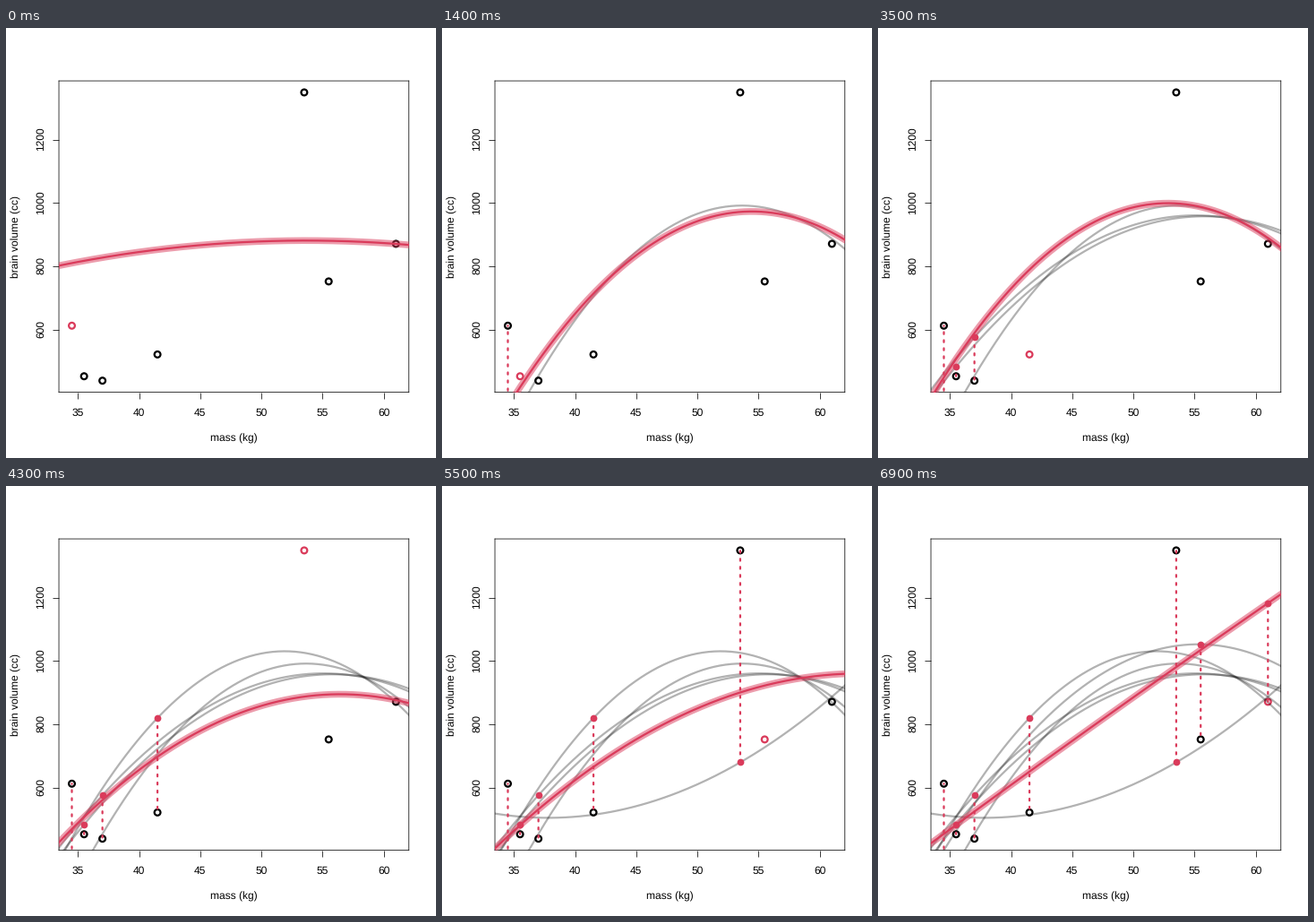
Animation, 480 px wide and 480 px high, one loop 7 s. Source, as a matplotlib script:

```python
import numpy as np
import matplotlib.pyplot as plt
from matplotlib.animation import FuncAnimation

plt.rcParams.update({
    "font.family": "Liberation Sans",
    "font.size": 12,
    "text.hinting": "none",
    "path.snap": False,
})

SIZE = 480
LEFT, RIGHT, TOP, BOTTOM = 59.04, 449.76, 59.04, 406.56
RED = "#da3b5b"
STEPS = 10

mass = np.array([34.5, 35.5, 37, 41.5, 53.5, 55.5, 61])
brain = np.array([612, 452, 438, 521, 1350, 752, 871])
COUNT = len(mass)

# Turning point of each parabola; the last is far away, so nearly straight
turns = [(53.65, 992), (55.8, 958), (55.1, 961), (51.9, 1031),
         (37.8, 504), (55.3, 1053), (500, 7050)]
START = 869


def padded(values):
    """Data range widened by 4 percent on both sides."""
    low, high = values.min(), values.max()
    pad = 0.04 * (high - low)
    return low - pad, high + pad


def parabola(left_out):
    """Least-squares bend around the turning point, without one data point."""
    x0, y0 = turns[left_out]
    square = (np.delete(mass, left_out) - x0) ** 2
    rise = np.delete(brain, left_out) - y0
    bend = (square * rise).sum() / (square ** 2).sum()
    return lambda x: y0 + bend * (x - x0) ** 2


def to_pixel(value, limits, start, end):
    return start + (value - limits[0]) / (limits[1] - limits[0]) * (end - start)


def label(x, y, text, rotation=0):
    fig.text(x / SIZE, 1 - y / SIZE, text, rotation=rotation, ha="center",
             va="baseline", rotation_mode="anchor")


xlim, ylim = padded(mass), padded(brain)
xticks, yticks = range(35, 61, 5), range(600, 1201, 200)

fig = plt.figure(figsize=(SIZE / 72, SIZE / 72), dpi=72, facecolor="white")
ax = fig.add_axes([LEFT / SIZE, 1 - BOTTOM / SIZE,
                   (RIGHT - LEFT) / SIZE, (BOTTOM - TOP) / SIZE])
ax.set(xlim=xlim, ylim=ylim, xticks=xticks, yticks=yticks)
ax.tick_params(length=7.2, width=0.75, labelbottom=False, labelleft=False)
for spine in ax.spines.values():
    spine.set_linewidth(0.75)

for tick in xticks:
    label(to_pixel(tick, xlim, LEFT, RIGHT), 432.5, str(tick))
for tick in yticks:
    label(42, to_pixel(tick, ylim, BOTTOM, TOP) - 1, str(tick), 90)
label((LEFT + RIGHT) / 2, 462, "mass (kg)")
label(15, (TOP + BOTTOM) / 2, "brain volume (cc)", 90)

grid = np.linspace(xlim[0] - 1, xlim[1] + 1, 200)
fits = [parabola(i) for i in range(COUNT)]
heights = [np.full_like(grid, START)] + [fit(grid) for fit in fits]

rings = ax.scatter(mass, brain, s=6.75 ** 2, facecolors="none",
                   edgecolors="black", linewidths=2.25, zorder=2)
halo, = ax.plot([], [], color=RED, alpha=0.5, lw=7.5, zorder=4)
line, = ax.plot([], [], color=RED, lw=2.25, zorder=5)

past, errors = [], []
for x, y, fit in zip(mass, brain, fits):
    guess = fit(x)
    past += ax.plot(grid, fit(grid), color="black", alpha=0.3, lw=2.25,
                    zorder=3)
    stem, = ax.plot([x, x], [guess, y], color=RED, lw=2.25, ls=(0, (1, 3)),
                    dash_capstyle="round", zorder=6)
    dot = ax.scatter(x, guess, s=7.75 ** 2, color=RED, linewidths=0, zorder=7)
    errors.append((stem, dot))


def update(frame):
    left_out, step = divmod(frame, STEPS)
    mix = (step + 1) / STEPS
    curve = (1 - mix) * heights[left_out] + mix * heights[left_out + 1]
    for artist in (halo, line):
        artist.set_data(grid, curve)
    rings.set_edgecolor([RED if i == left_out else "black"
                         for i in range(COUNT)])
    done = (frame + 1) // STEPS
    for i in range(COUNT):
        past[i].set_visible(i < left_out)
        for artist in errors[i]:
            artist.set_visible(i < done)
    return [rings, halo, line]


anim = FuncAnimation(fig, update, frames=COUNT * STEPS, interval=100,
                     init_func=lambda: update(0), repeat=True, repeat_delay=0)
plt.show()
```
